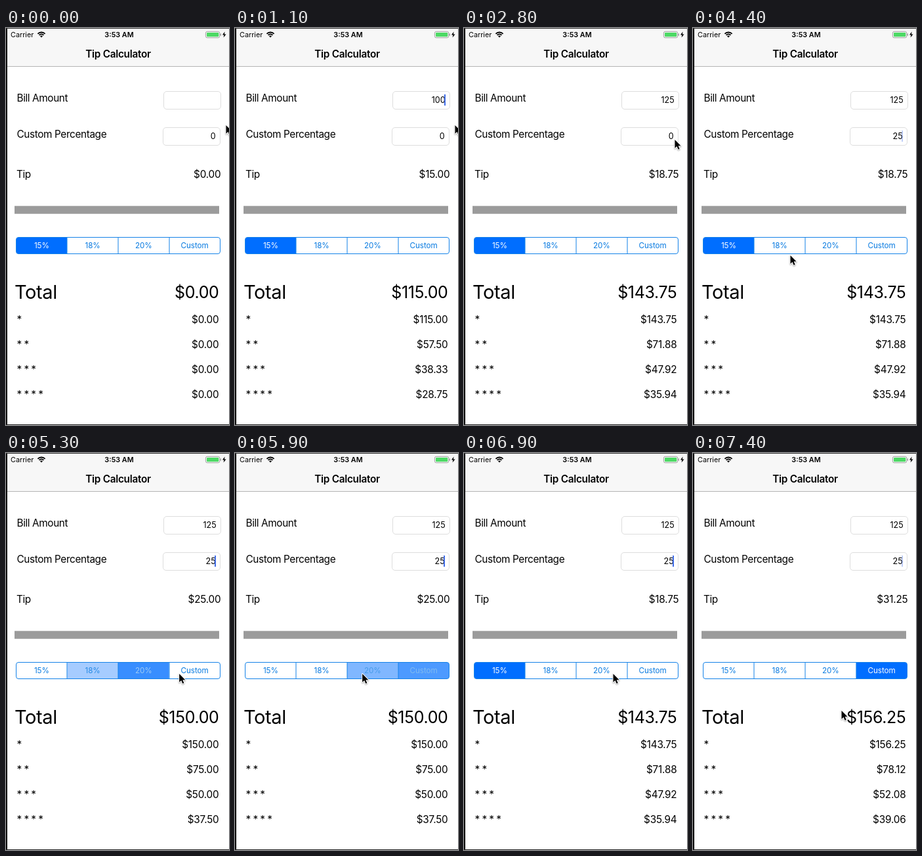
Recreate the animation shown at these times as an HTML page with a canvas. Size 340 by 604 pixels, loop 7.5 s.

```html
<!DOCTYPE html>
<html lang="en">
<head>
<meta charset="utf-8">
<title>Tip Calculator</title>
<style>
html, body { margin: 0; width: 100%; height: 100%; overflow: hidden; background: #fff; }
canvas { display: block; width: 340px; height: 604px; }
</style>
</head>
<body>
<canvas id="stage"></canvas>
<script>
const W = 340, H = 604, LOOP = 7500, STEP = 100;
const BLUE = [0, 110, 255], LINK = [8, 122, 224], WHITE = [255, 255, 255];
const BODY = 15.35, SMALL = 10.8;
const canvas = document.getElementById('stage');
const ctx = canvas.getContext('2d');
const dpr = window.devicePixelRatio || 1;
canvas.width = W * dpr;
canvas.height = H * dpr;

const bar = { x: 15.5, y: 318.5, h: 25, cell: 77.75, names: ['15%', '18%', '20%', 'Custom'] };
const taps = [
  { time: 4800, cell: 1 }, { time: 5200, cell: 2 }, { time: 5500, cell: 3 }, { time: 5900, cell: 2 },
  { time: 6200, cell: 1 }, { time: 6500, cell: 0 }, { time: 7200, cell: 3 }
];

// The pointer reaches each segment one step before the tap is released.
const stop = (time, x, y) => ({ time, x, y });
const path = [
  stop(2400, 335, 147), stop(2800, 321, 169), stop(4000, 321, 169), stop(4400, 148, 345),
  ...taps.map(tap => stop(tap.time - STEP, 77 + 70 * tap.cell, 335)),
  stop(7400, 226, 391)
];

const clamp = (v, lo, hi) => Math.min(hi, Math.max(lo, v));
const lerp = (a, b, k) => a + (b - a) * k;
const mix = (a, b, k) => `rgb(${a.map((v, i) => Math.round(lerp(v, b[i], k))).join(',')})`;
const dollars = new Intl.NumberFormat('en-US', {
  minimumFractionDigits: 2, maximumFractionDigits: 2, useGrouping: false, roundingMode: 'halfEven'
});
const money = v => '$' + dollars.format(v);

// One state per step, holding the first before the start and the last after the end.
const entry = (t, start, states) =>
  states[clamp(Math.floor((t - start) / STEP) + 1, 0, states.length - 1)];

const billAt = t => t < 1700
  ? entry(t, 500, ['', '1', '10', '100'])
  : entry(t, 1800, ['100', '10', '1', '12', '125']);
const customAt = t => entry(t, 3500, ['0', '', '2', '25']);

function caretAt(t) {
  const phase = t % 1000;
  const typing = t < 1000 || (t >= 3400 && t < 4000);
  return typing || phase < 400 || phase >= 800 ? 1 : Math.max(0, 1 - phase / 600);
}

function text(str, x, y, size, { align = 'left', weight = 400, color = '#000', track = -0.025 } = {}) {
  ctx.font = `${weight} ${size}px Inter, "Liberation Sans", sans-serif`;
  ctx.letterSpacing = `${track * size}px`;
  ctx.textAlign = align;
  ctx.fillStyle = color;
  ctx.fillText(str, x, y);
}

const amount = (v, x, y, size) => text(money(v), x, y, size, { align: 'right', track: -.014 });

function rect(x, y, w, h, color) {
  ctx.fillStyle = color;
  ctx.fillRect(x, y, w, h);
}

function rounded(x, y, w, h, r) {
  ctx.beginPath();
  ctx.roundRect(x, y, w, h, r);
}

function shape(points, x, y, scale = 1) {
  ctx.beginPath();
  points.forEach(([px, py]) => ctx.lineTo(x + px * scale, y + py * scale));
  ctx.closePath();
}

function wifi(x, y) {
  const arc = r => {
    ctx.beginPath();
    ctx.arc(x, y, r, -Math.PI * .75, -Math.PI * .25);
  };
  ctx.strokeStyle = ctx.fillStyle = '#000';
  ctx.lineWidth = 1.9;
  for (const r of [4.9, 7.9]) {
    arc(r);
    ctx.stroke();
  }
  arc(2.8);
  ctx.lineTo(x, y);
  ctx.fill();
}

function battery() {
  ctx.lineWidth = .8;
  ctx.strokeStyle = '#8b8b8b';
  rounded(304.4, 5.4, 21.4, 9.4, 2.4);
  ctx.stroke();
  ctx.fillStyle = '#4cd964';
  rounded(306, 7, 18.3, 6.3, 1);
  ctx.fill();
  rect(326.7, 8.5, 1.2, 3.2, '#8b8b8b');
  ctx.fillStyle = '#000';
  shape([[3.6, 0], [0, 5], [2.4, 5], [1.6, 9], [5.6, 3.8], [3, 3.8]], 330, 5.6);
  ctx.fill();
}

function header() {
  rect(0, 0, W, 58, '#f7f7f7');
  rect(0, 58, W, 1, '#b5b5b5');
  text('Carrier', 7, 14, SMALL, { track: 0 });
  text('3:53 AM', 172.5, 14, SMALL, { align: 'center', weight: 600, track: 0 });
  wifi(54, 14.4);
  battery();
  text('Tip Calculator', 171, 44.5, BODY, { align: 'center', weight: 600, track: -.018 });
}

function field(x, y, value, caret) {
  const w = 87, right = x + w - 6.5;
  ctx.strokeStyle = '#dedede';
  ctx.lineWidth = 1;
  rounded(x + .5, y + .5, w, 27, 4.5);
  ctx.stroke();
  text(value, right, y + 18.2, 12.6, { align: 'right', track: -.01 });
  ctx.globalAlpha = caret;
  rect(right - 1.4, y + 5, 1.9, 17, '#3867e8');
  ctx.globalAlpha = 1;
}

// How far segment i is filled: old selection fades out, new one fades in.
function fillLevel(i, t, now, before) {
  const n = (t - now.time) / STEP;
  if (i === now.cell) return Math.min(1, .5 + .28 * n);
  return i === before.cell ? Math.max(0, .7 - .35 * n) : 0;
}

function segments(t, now, before) {
  const pressed = taps.find(tap => tap.time - STEP === t);
  const outline = () => rounded(bar.x, bar.y, bar.cell * 4, bar.h, 3.5);
  const left = i => bar.x + bar.cell * i;
  const levels = bar.names.map((_, i) => fillLevel(i, t, now, before));

  ctx.save();
  outline();
  ctx.clip();
  levels.forEach((k, i) => {
    const tint = pressed?.cell === i ? Math.max(k, .18) : k;
    rect(left(i), bar.y, bar.cell, bar.h, mix(WHITE, BLUE, tint));
  });
  ctx.restore();

  ctx.strokeStyle = '#1482e8';
  ctx.lineWidth = 1;
  outline();
  ctx.stroke();
  levels.forEach((k, i) => {
    if (i) rect(Math.round(left(i)) - .5, bar.y, 1, bar.h, '#1482e8');
    text(bar.names[i], left(i + .5), 335, 11.7, { align: 'center', color: mix(LINK, WHITE, k * k), track: -.005 });
  });
}

function pointer(t) {
  const to = path.find(p => p.time > t) || path.at(-1);
  const from = path[Math.max(0, path.indexOf(to) - 1)];
  const k = clamp((t - from.time) / (to.time - from.time || 1), 0, 1);
  const x = lerp(from.x, to.x, k) + .5, y = lerp(from.y, to.y, k) + 1;
  shape([[0, 0], [0, 14.5], [3.4, 11.4], [5.8, 16.8], [8.2, 15.8], [5.9, 10.5], [10.4, 10.5]], x, y, .88);
  ctx.save();
  ctx.shadowColor = 'rgba(0,0,0,.35)';
  ctx.shadowBlur = 2 * dpr;
  ctx.shadowOffsetY = dpr;
  ctx.lineJoin = 'round';
  ctx.lineWidth = 2;
  ctx.strokeStyle = '#fff';
  ctx.stroke();
  ctx.restore();
  ctx.fillStyle = '#000';
  ctx.fill();
}

function draw(t) {
  ctx.setTransform(dpr, 0, 0, dpr, 0, 0);
  rect(0, 0, W, H, '#fff');
  header();

  const first = { time: -LOOP, cell: 0 };
  const [before, now] = [first, first, ...taps.filter(tap => tap.time <= t)].slice(-2);
  const bill = billAt(t), custom = customAt(t);
  const tip = bill * [15, 18, 20, custom][now.cell] / 100;
  const total = Number(bill) + tip;
  const caret = caretAt(t);

  text('Bill Amount', 16.5, 112, BODY);
  text('Custom Percentage', 16.5, 167, BODY);
  text('Tip', 16, 228.3, BODY);
  field(240, 96, bill, t >= 100 && t < 2600 ? caret : 0);
  field(239, 151, custom, t >= 3000 ? caret : 0);
  amount(tip, 327.5, 228.3, BODY);
  rect(13, 270.7, 312, 12, '#9b9b9b');
  segments(t, now, before);

  text('Total', 13, 411.5, 29, { track: -.014 });
  amount(total, 324.5, 410.5, 25);
  for (let n = 1; n <= 4; n++) {
    const y = 410.2 + 38.3 * n;
    text(Array(n).fill('*').join(' '), 16.5, y, BODY, { track: -.035 });
    amount(total / n, 324.5, y, BODY);
  }

  rect(0, 0, 2, H, '#111');
  rect(0, 0, W, 1, '#333');
  rect(0, 603, W, 1, '#222');
  pointer(t);
}

const start = performance.now();
function tick() {
  const ms = (performance.now() - start) % LOOP;
  draw(Math.floor(ms / STEP) * STEP);
  requestAnimationFrame(tick);
}
tick();
</script>
</body>
</html>
```
